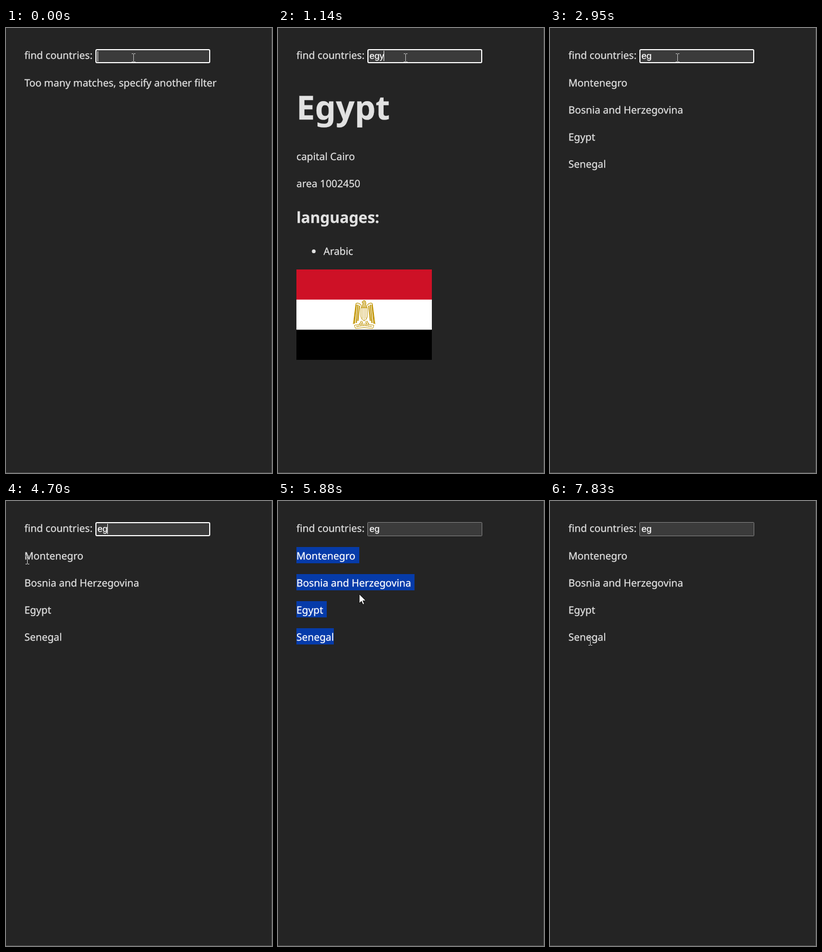
Recreate the animation shown at these times as an HTML page. Size 491x822 px, loop 8000 ms.

```html
<!DOCTYPE html>
<html lang="en">
<head>
<meta charset="utf-8">
<title>Find countries</title>
<style>
  html, body { margin: 0; width: 100%; height: 100%; overflow: hidden; background: #242424; }
  svg { display: block; }
  text { font: 18.6px "Noto Sans", "Open Sans", sans-serif; fill: #e2e2e2; stroke: #e2e2e2; stroke-width: .25px; text-rendering: geometricPrecision; }
  .h1 { font-size: 61px; font-weight: 700; }
  .h2 { font-size: 28px; font-weight: 700; }
  #query { font: 16.667px "Liberation Sans", Arial, sans-serif; }
  #query, .selected { fill: #fff; stroke: #fff; }
  #selection { fill: #063ba9; }
  #beam { fill: none; stroke: #fff; mix-blend-mode: difference; }
</style>
</head>
<body>
<svg width="491" height="822" viewBox="0 0 491 822">
  <rect width="491" height="822" fill="#242424"/>
  <path d="M490.5 0V822M0 821.5H491" stroke="#505050"/>

  <text x="34" y="57">find countries:</text>
  <rect id="field" fill="#3b3b3b"/>
  <text id="query" x="169" y="57"></text>
  <rect id="caret" y="42" width="1" height="19" fill="#fff"/>

  <text id="notice" x="34" y="108">Too many matches, specify another filter</text>

  <g id="list"><g id="selection"></g></g>

  <g id="country">
    <text class="h1" x="34" y="169">Egypt</text>
    <text x="34" y="244">capital Cairo</text>
    <text x="34" y="294">area 1002450</text>
    <text class="h2" x="34" y="360">languages:</text>
    <circle cx="66" cy="412.5" r="3.5" fill="#e2e2e2"/>
    <text x="84" y="419">Arabic</text>
    <g transform="translate(34 446)">
      <rect width="250" height="167" fill="#fff"/>
      <rect width="250" height="55.7" fill="#ce1126"/>
      <rect y="111.3" width="250" height="55.7"/>
    </g>
    <g transform="translate(159 503)" fill="none" stroke="#c09300">
      <g id="wing">
        <path d="M5 10Q10 3 15 6L20 44" stroke-width="1.2"/>
        <path d="M14.5 8L18 43M11.5 8L14.5 42M8.5 10L11.5 38" stroke-width="2"/>
        <path d="M5 38L9 45M3 39L5 46" stroke-width="1.3"/>
      </g>
      <use href="#wing" transform="scale(-1 1)"/>
      <path d="M-4 4Q-2 -1 2 1Q4 4 3 9L6 13H-6L-3 9L-2 5Z" fill="#c09300" fill-opacity=".5"/>
      <path d="M-6 14H6V30Q5 36 0 38Q-5 36 -6 30Z" fill="#fff"/>
      <path d="M-3 15V34M0 15V37M3 15V34" stroke-width=".8"/>
      <path d="M-18 46Q0 42 18 46L16 52Q0 49 -16 52Z" fill="#fff"/>
      <path d="M-14 48.5Q0 45 14 48.5" stroke-width="2" stroke-dasharray="2 1"/>
    </g>
  </g>

  <path id="beam" d="M-3 -7.5H0M1 -7.5H4M.5 -7V7M-3 7.5H0M1 7.5H4"/>
  <g id="pointer">
    <path d="M0 0V17L4 13.2L6.8 19.3L9.4 18.2L6.7 12.2H12.2Z" fill="#fff" stroke="#000" stroke-width=".9"/>
    <g id="busy" fill="none" stroke-width="3.6">
      <circle cx="13.5" cy=".5" r="5.8" stroke="#2b97ee"/>
      <path d="M8.5 3.5A5.8 5.8 0 0 1 11.5 -4.9" stroke="#35c3f7"/>
    </g>
  </g>
</svg>
<script>
const LOOP = 8000;
const $ = id => document.getElementById(id);
const svgNode = (name, attrs, parent) => {
  const node = document.createElementNS("http://www.w3.org/2000/svg", name);
  set(node, attrs);
  return parent.appendChild(node);
};
function set(node, attrs) {
  for (const key in attrs) node.setAttribute(key, attrs[key]);
}
const show = (id, on) => set($(id), { visibility: on ? "visible" : "hidden" });

const rows = ["Montenegro", "Bosnia and Herzegovina", "Egypt", "Senegal"].map((name, i) => {
  const mark = svgNode("rect", { x: 34, y: 85 + 50 * i, height: 30 }, $("selection"));
  const label = svgNode("text", { x: 34, y: 108 + 50 * i }, $("list"));
  label.textContent = name;
  return { mark, label };
});

// Each track is a list of [start in ms, value]; values hold until the next entry.
const query = [[0, ""], [990, "eg"], [1140, "egy"], [2950, "eg"]];
const caret = [[0, 1], [290, 0], [720, 1], [1600, 0], [2190, 1], [2660, 0], [3250, 1],
  [3680, 0], [4260, 1], [4850, 0], [6310, 1], [6770, 0]];
const focus = [[0, 1], [4850, 0], [6310, 1], [7230, 0]];
const selected = [[0, []], [5000, [116, 40]], [5150, [116, 218, 50]],
  [5280, [116, 218, 56, 69]], [6310, []]];
const cursor = [
  [0, ["beam", 235, 55]], [4110, ["beam", 222, 58]], [4260, ["arrow", 160, 76]],
  [4410, ["beam", 90, 99]], [4550, ["beam", 50, 107]], [4700, ["beam", 39, 109]],
  [4850, ["beam", 37, 109]], [5000, ["beam", 74, 152]], [5150, ["busy", 95, 214]],
  [5280, ["busy", 104, 236]], [5430, ["busy", 108, 244]], [5730, ["arrow", 118, 225]],
  [5880, ["arrow", 150, 172]], [6030, ["arrow", 186, 108]], [6180, ["beam", 212, 62]],
  [6310, ["beam", 217, 57]], [6620, ["beam", 213, 60]], [6770, ["arrow", 180, 98]],
  [6920, ["arrow", 126, 172]], [7070, ["arrow", 76, 228]], [7230, ["beam", 60, 256]],
  [7380, ["beam", 74, 259]], [7680, ["beam", 74, 260]], [7830, ["beam", 74, 259]]
];
const at = (track, t) => track.findLast(([start]) => start <= t)[1];

function draw(t) {
  const text = at(query, t);
  $("query").textContent = text;
  show("notice", text === "");
  show("list", text === "eg");
  show("country", text === "egy");

  set($("field"), at(focus, t)
    ? { x: 166, y: 40, width: 210, height: 24, rx: 2, stroke: "#fff", "stroke-width": 2 }
    : { x: 165.5, y: 39.5, width: 211, height: 25, rx: 1, stroke: "#858585", "stroke-width": 1 });
  set($("caret"), { x: { "": 169, eg: 187, egy: 195 }[text], y: text ? 42 : 43 });
  show("caret", at(caret, t));

  const widths = at(selected, t);
  rows.forEach(({ mark, label }, i) => {
    set(mark, { width: widths[i] || 0 });
    label.classList.toggle("selected", widths[i] > 0);
  });

  const [kind, x, y] = at(cursor, t);
  show("beam", kind === "beam");
  show("pointer", kind !== "beam");
  show("busy", kind === "busy");
  set($(kind === "beam" ? "beam" : "pointer"), { transform: `translate(${x} ${y})` });
}

const begin = performance.now();
function tick() {
  draw((performance.now() - begin) % LOOP);
  requestAnimationFrame(tick);
}
tick();
</script>
</body>
</html>
```
